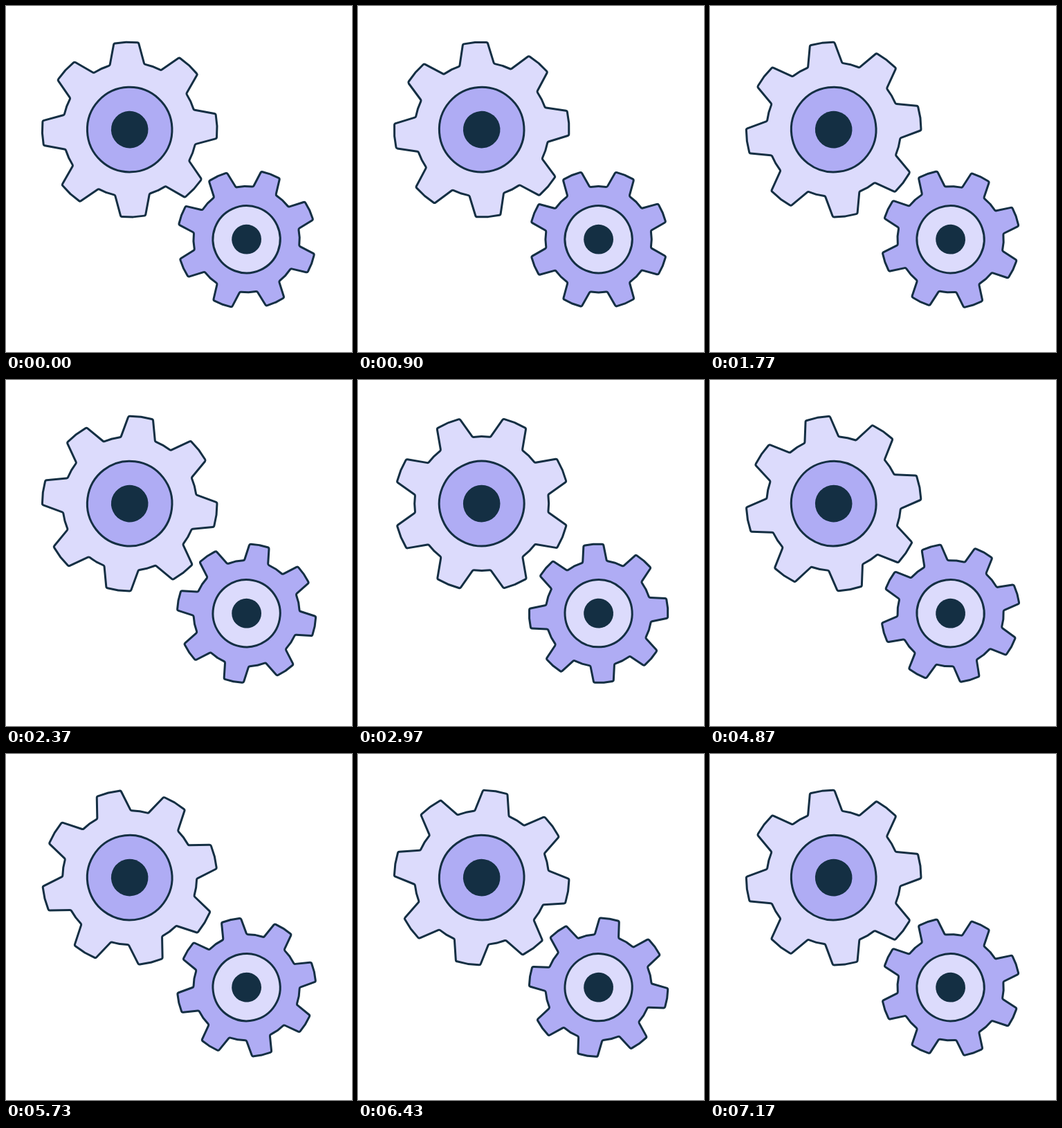
Animation of 500 by 500 pixels, one loop 7.21 s. Source, as an HTML page with a canvas:

```html
<!DOCTYPE html>
<html lang="en">
<head>
<meta charset="utf-8">
<title>Turning gears</title>
<style>
html, body { margin: 0; width: 100%; height: 100%; overflow: hidden; background: #fff; }
canvas { display: block; }
</style>
</head>
<body>
<canvas id="stage" width="500" height="500"></canvas>
<script>
const ctx = document.getElementById('stage').getContext('2d');
const DARK = '#142f43', LIGHT = '#dcdbfc', MID = '#afacf4';
const LOOP = 7210, FRAMES = 216, TEETH = 8;
const RAD = Math.PI / 180;

// Angles are in degrees, clockwise from the top.
const big = { x: 178.7, y: 178.6, tip: 126.4, root: 97, tipHalf: 8.1, rootHalf: 14.9,
  ring: 61.3, hub: 26.8, line: 3, body: LIGHT, disc: MID };
const small = { x: 347.6, y: 337.2, tip: 100.3, root: 76.7, tipHalf: 8.2, rootHalf: 13.1,
  ring: 48.6, hub: 21.4, line: 3, body: MID, disc: LIGHT };

function outline(g) {
  const pitch = 360 / TEETH, points = [];
  const add = (r, deg) => points.push([r * Math.sin(deg * RAD), -r * Math.cos(deg * RAD)]);
  for (let i = 0; i < TEETH; i++) {
    const a = i * pitch;
    add(g.root, a - g.rootHalf);
    add(g.tip, a - g.tipHalf);
    add(g.tip, a);
    add(g.tip, a + g.tipHalf);
    add(g.root, a + g.rootHalf);
    add(g.root, a + pitch / 2);
  }
  const path = new Path2D(), n = points.length;
  path.moveTo((points[n - 1][0] + points[0][0]) / 2, (points[n - 1][1] + points[0][1]) / 2);
  points.forEach((p, i) => path.arcTo(...p, ...points[(i + 1) % n], 2.5));
  path.closePath();
  return path;
}

function circle(r, fill, stroked) {
  ctx.beginPath();
  ctx.arc(0, 0, r, 0, 2 * Math.PI);
  ctx.fillStyle = fill;
  ctx.fill();
  if (stroked) ctx.stroke();
}

function drawGear(g, angle) {
  ctx.save();
  ctx.translate(g.x, g.y);
  ctx.rotate(angle * RAD);
  ctx.lineWidth = g.line;
  ctx.strokeStyle = DARK;
  ctx.lineJoin = 'round';
  ctx.fillStyle = g.body;
  ctx.fill(g.path);
  ctx.stroke(g.path);
  circle(g.ring, g.disc, true);
  circle(g.hub, DARK, false);
  ctx.restore();
}

// Thirty poses a second; every odd pose lags a little.
function angleAt(ms) {
  const n = Math.min(FRAMES - 1, Math.floor((10 * Math.floor(ms / 10) + 4) * 0.03));
  return -2.3 + n * 10 / 3 - (n % 2) * 2;
}

const start = performance.now();
function render() {
  const angle = angleAt((performance.now() - start) % LOOP);
  ctx.fillStyle = '#fff';
  ctx.fillRect(0, 0, 500, 500);
  drawGear(big, angle);
  drawGear(small, 18.1 - angle);
  requestAnimationFrame(render);
}

for (const g of [big, small]) g.path = outline(g);
render();
</script>
</body>
</html>
```
